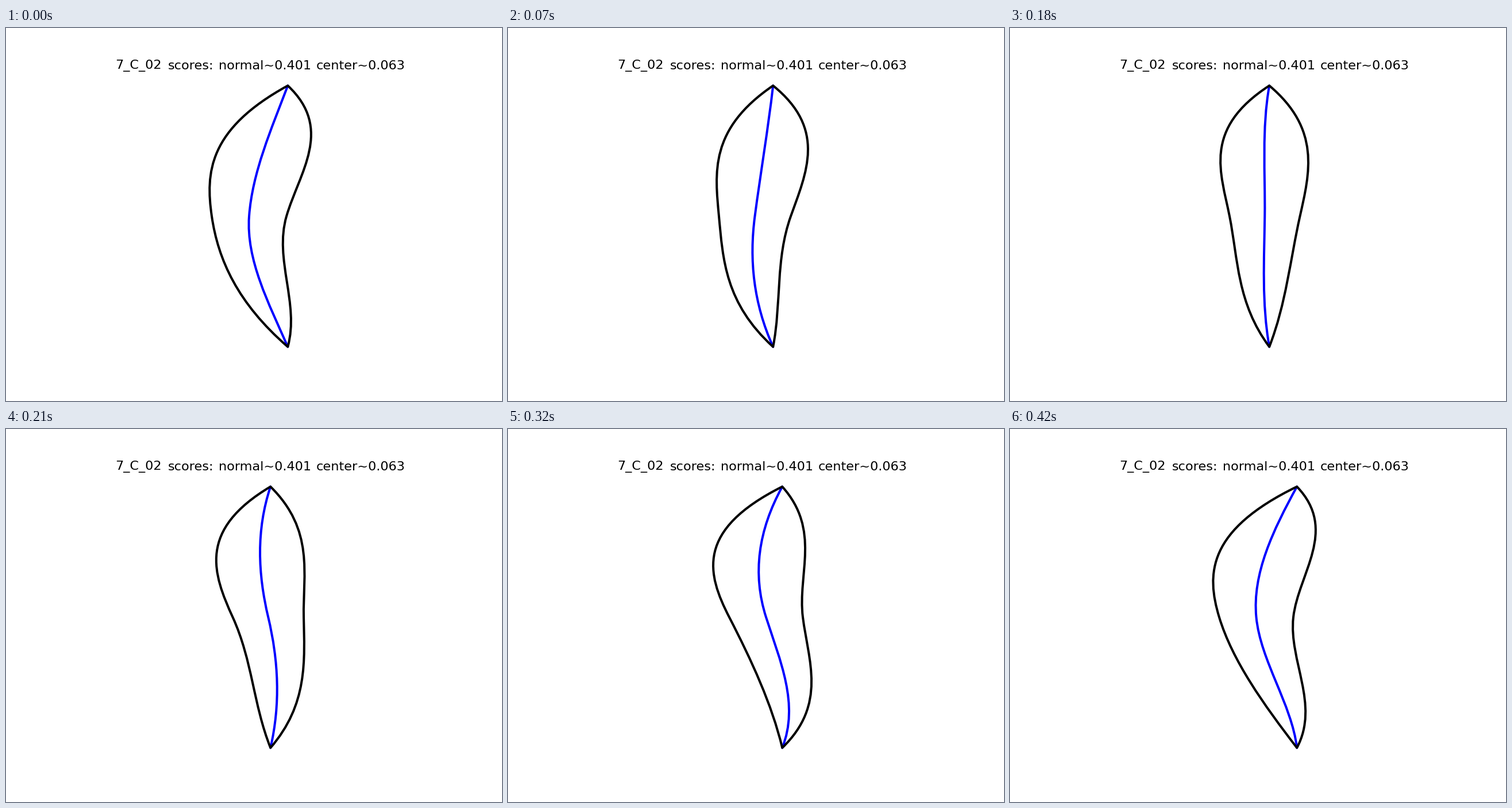
A matplotlib script for the animation above (0.49 s loop, 863 by 649 pixels).

```python
import matplotlib.pyplot as plt
from matplotlib.animation import FuncAnimation
from matplotlib.path import Path
from matplotlib.patches import PathPatch
import numpy as np

W, H, DPI = 863, 649, 128
PX = 72 / DPI  # points per pixel
TOP, BOTTOM = 100.3, 554.7
Y = np.linspace(TOP, BOTTOM, 7)

# Each pose: tip x, then control x values of the left and the right edge
# (two upper handles, the middle joint, the last lower handle).
POSES = [
    (490.3, (352, 347, 358, 403), (571, 510, 488, 511)),
    (461.2, (350, 360, 367, 378), (555, 519, 492, 476)),
    (451.2, (334.5, 367, 382, 395), (541, 521.5, 504.5, 480.5)),
    (460.2, (333, 360, 394.5, 430), (537, 516.5, 518, 525.5)),
    (477.2, (326, 346, 385, 459), (545, 503.5, 513, 555.5)),
    (495.6, (334, 344.5, 376, 465.5), (567, 497, 505, 553)),
    (499.2, (343.5, 341, 364, 441), (572, 501.5, 493, 539.5)),
]

fig = plt.figure(figsize=(W / DPI, H / DPI), dpi=DPI, facecolor="white")
ax = fig.add_axes([0, 0, 1, 1])
ax.set_xlim(0, W)
ax.set_ylim(H, 0)
ax.axis("off")

words = [(190.4, "7_C_02"), (282, "scores:"),
         (369.7, "normal~0.401"), (540, "center~0.063")]
for x, word in words:
    ax.text(x, 71.5, word, family="DejaVu Sans", size=22.4 * PX,
            color="black", va="baseline", ha="left")


def edge(tip, handles):
    """Seven Bezier controls from top to bottom, smooth at the middle joint."""
    p1, p2, mid, q2 = handles
    return np.array([tip, p1, p2, mid, 2 * mid - p2, q2, tip])


def curve(x):
    return Path(np.column_stack([x, Y]), [Path.MOVETO] + [Path.CURVE4] * 6)


def outline(left, right):
    down = np.column_stack([left, Y])
    up = np.column_stack([right, Y])[::-1]
    verts = np.vstack([down, up[1:], down[:1]])
    codes = [Path.MOVETO] + [Path.CURVE4] * 12 + [Path.CLOSEPOLY]
    return Path(verts, codes)


def stroke(color, z):
    patch = PathPatch(Path([(0, 0)]), fill=False, ec=color, lw=4 * PX,
                      joinstyle="round", capstyle="round", zorder=z)
    return ax.add_patch(patch)


spine = stroke("#0000ff", 2)
body = stroke("black", 3)


def draw(i):
    tip, lh, rh = POSES[i % len(POSES)]
    left, right = edge(tip, lh), edge(tip, rh)
    spine.set_path(curve((left + right) / 2))
    body.set_path(outline(left, right))
    return spine, body


anim = FuncAnimation(fig, draw, frames=len(POSES), interval=70,
                     init_func=lambda: draw(0), repeat=True, repeat_delay=0)
plt.show()
```
